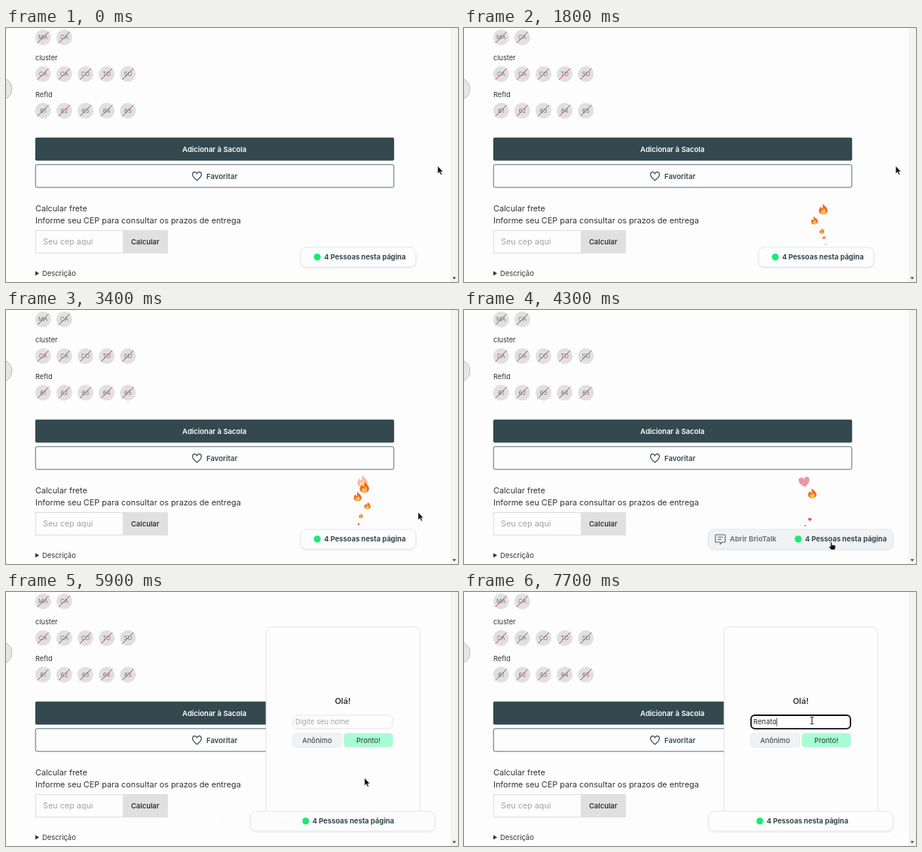
These frames come from a looping animation (600 by 338 pixels, 8 s). An HTML page:

```html
<!DOCTYPE html>
<html lang="pt-BR">
<head>
<meta charset="utf-8">
<style>
  html, body { margin: 0; height: 100%; overflow: hidden; background: #fdfdfd; }
  svg { display: block; width: 100vw; height: 100vh; }
  text { font: 9.4px Inter, "Open Sans", sans-serif; fill: #333; white-space: pre; }
  .b { font-weight: 600; }
  .bold { font-weight: 700; }
  .big { font-size: 10.8px; }
  .mid { text-anchor: middle; }
  .ink { fill: #33494f; }
  .hint { fill: #a3a3a3; }
  .line { fill: none; stroke: #33494f; }
</style>
</head>
<body>
<svg viewBox="0 0 600 338">
  <defs>
    <g id="flame" transform="scale(1.2 1)">
      <path fill="#ee6a2c" d="M0-10C2-6 7-3 7 3C7 8 3 10 0 10C-4 10-7 7-7 3C-7 0-5-2-4-5C-3-2-2-1-1-1C0-4-1-7 0-10Z"/>
      <path fill="#ffc33c" d="M1-2C2 1 4 2 4 5C4 8 2 9.500 0 9.500C-3 9.500-4 7-4 5C-4 3-3 2-2.500 1C-2 2-1 3 0 3C1 1 0 0 1-2Z"/>
    </g>
    <path id="heart" fill="#e5495c" d="M0 9C-6 4-9 1-9-3C-9-9-2-9 0-4C2-9 9-9 9-3C9 1 6 4 0 9Z"/>
    <clipPath id="clip"><rect id="clipBox" x="340" width="215" height="300"/></clipPath>
    <filter id="shadow" x="-10%" y="-30%" width="120%" height="170%">
      <feDropShadow dx="0" dy="1" stdDeviation="1.2" flood-opacity=".1"/>
    </filter>
  </defs>

  <rect width="600" height="338" fill="#fdfdfd"/>
  <rect x="590" width="10" height="338" fill="#f4f4f4"/>
  <path d="M592.500 331.500h5l-2.500 3z" fill="#444"/>
  <circle cx="-7" cy="81" r="15" fill="#e6e6e6" stroke="#aaa" stroke-width=".7"/>

  <g id="swatches"></g>
  <text x="39" y="43" style="font-size:9.2px">cluster</text>
  <text x="39" y="91.500" style="font-size:9.2px">RefId</text>

  <rect x="38.800" y="145.800" width="476.400" height="30.800" rx="2" fill="#33494f"/>
  <text class="b mid" x="276.700" y="164.500" style="font-size:9.5px;fill:#fff">Adicionar à Sacola</text>
  <rect class="line" x="39.200" y="181.800" width="475.600" height="30.300" rx="2" stroke-width=".8"/>
  <path class="line" stroke-width="1.200" d="M253.500 202.800C249 199 247.600 197.200 247.600 194.900C247.600 191 252 190.400 253.500 193.700C255 190.400 259.400 191 259.400 194.900C259.400 197.200 258 199 253.500 202.800Z"/>
  <text class="b ink" x="266" y="200.500" style="font-size:9.6px">Favoritar</text>

  <text class="big" x="39" y="244">Calcular frete</text>
  <text class="big" x="39" y="259.500">Informe seu CEP para consultar os prazos de entrega</text>
  <rect x="39.500" y="269.500" width="116" height="30" fill="#fdfdfd" stroke="#dcdcdc"/>
  <text class="big hint" x="49" y="288">Seu cep aqui</text>
  <rect x="155" y="269" width="60" height="31" rx="1" fill="#e0e0e0"/>
  <text class="b mid" x="184.700" y="287.700">Calcular</text>
  <path d="M39 323.500l5 3-5 3z" fill="#333"/>
  <text x="48" y="330">Descrição</text>

  <g id="sparks"></g>

  <g id="panel" clip-path="url(#clip)">
    <rect id="frame" x="345.200" width="204.200" rx="7" fill="#fdfdfd" stroke="#e2e3e6"/>
    <g id="form">
      <text class="b mid" x="447" y="148.500" style="font-size:11px">Olá!</text>
      <rect id="field" x="381" y="164" width="132" height="17.800" rx="5" fill="#fdfdfd"/>
      <text id="entry" x="384" y="176"></text>
      <path id="caret" stroke="#222" stroke-width=".8"/>
      <rect x="380.500" y="188" width="65" height="18.300" rx="4" fill="#f1f2f4" stroke="#e2e4e8" stroke-width=".7"/>
      <text class="mid" x="413" y="200.500">Anônimo</text>
      <rect x="448.700" y="188" width="64.800" height="18.300" rx="4" fill="#a6fdd3" stroke="#c6f6e0" stroke-width=".7"/>
      <text class="mid" x="481" y="200.500">Pronto!</text>
    </g>
  </g>

  <rect id="pill" y="292" height="26" rx="7" stroke="#dfe2e5" stroke-width=".8" filter="url(#shadow)"/>
  <g id="people">
    <g id="label">
      <path d="M-109-5.800h11a1 1 0 0 1 1 1v8a1 1 0 0 1-1 1h-3l-2.500 2.500v-2.500h-5.500a1 1 0 0 1-1-1v-8a1 1 0 0 1 1-1zM-107-2.500h7M-107 .700h5" fill="none" stroke="#5c686e" stroke-width="1.100"/>
      <text id="action" class="bold" x="-91" y="3.300" style="fill:#6f7a81"></text>
    </g>
    <circle id="halo" fill="#16ec6e"/>
    <circle r="4.500" fill="#16ec6e"/>
    <text class="bold ink" x="9" y="3.300">4 Pessoas nesta página</text>
  </g>

  <g id="cursor" stroke-linejoin="round">
    <path d="M0 0V10.500L2.400 8.300L4 12L5.800 11.200L4.200 7.700H7.300Z" fill="#111" stroke="#fff" stroke-width=".6"/>
    <path d="M-.500.500C.400-.200 1.300.300 1.300 1.300V4L5 4.600C6 4.900 6.300 5.600 6.100 6.600L5.500 10.500H.300L-2.600 7C-3 6-2 5.300-.500 6.700Z" fill="#111" stroke="#fff" stroke-width=".5"/>
    <path d="M-2-4.500H-.500L0-4L.500-4.500H2M0-4V4M-2 4.500H-.500L0 4L.500 4.500H2" fill="none" stroke="#111"/>
  </g>
</svg>

<script>
const LOOP = 8000, LIFE = 1150, NAME = "Renato";
const $ = id => document.getElementById(id);
const set = (el, attrs) => { for (const k in attrs) el.setAttribute(k, attrs[k]); };
const add = (parent, tag, attrs) => {
  const el = document.createElementNS("http://www.w3.org/2000/svg", tag);
  set(el, attrs);
  return parent.appendChild(el);
};
const ramp = (t, start, span) => Math.max(0, Math.min(1, (t - start) / span));
const smooth = u => u * u * (3 - 2 * u);

// Crossed-out option swatches
[[12.5, "MA CA"], [61.3, "CA CA CO TO SU"], [110, "61 62 63 64 65"]].forEach(([y, row]) =>
  row.split(" ").forEach((code, i) => {
    const x = 49.2 + 28.15 * i, g = $("swatches");
    add(g, "circle", { cx: x, cy: y, r: 10.5, fill: "#e0e0e0" });
    add(g, "text", { x, y: y + 2.8, class: "mid", style: "font-size:7.8px;fill:#777" }).textContent = code;
    add(g, "path", { d: `M${x - 7.5} ${y + 7.5}l15-15`, stroke: "#b8465c" });
  }));

// Rising reactions: birth, start x, drift, heart?
const sparks = [
  [857, 480, -4], [1070, 479, -22], [1295, 479, -9], [1455, 480, -7], [1675, 480, 0],
  [1850, 478, -10], [2060, 474, 4], [2285, 476, -3], [2388, 474, 2], [2554, 474, -10],
  [2733, 474, 10], [2963, 473, -5], [3195, 472, -21, 1], [3397, 470, -10],
  [3955, 457, 7, 1], [4145, 453, 0, 1], [4350, 455, -6, 1]
].map(([birth, x, drift, heart]) => ({
  birth, x, drift, el: add($("sparks"), "use", { href: heart ? "#heart" : "#flame" })
}));

// Pointer stops: start, span, x, y
const moves = [[2200, 700, 547, 269], [3700, 400, 487, 308.5], [5600, 650, 462, 171]];
const pointer = t => moves.reduce(([x, y], [start, span, nx, ny]) => {
  const u = smooth(ramp(t, start, span));
  return [x + (nx - x) * u, y + (ny - y) * u];
}, [573, 183.5]);

function draw(t) {
  for (const { birth, x, drift, el } of sparks) {
    const p = (t - birth) / LIFE, on = p > 0 && p < 1;
    el.style.display = on ? "" : "none";
    if (on) set(el, {
      transform: `translate(${x + drift * p} ${291 - 66 * p ** 1.4}) rotate(${drift / 2}) scale(${0.84 * p})`,
      opacity: Math.min(1, (1 - p) * 15)
    });
  }

  const shut = (1 - ramp(t, 4600, 500)) ** 3, top = 46.3 + 250 * shut;
  $("panel").style.display = t >= 4600 ? "" : "none";
  set($("frame"), { y: top, height: 312 - top });
  set($("clipBox"), { y: top - 1 });
  set($("form"), { transform: `translate(0 ${125 * shut})` });

  const focus = t >= 6500, typed = Math.max(0, Math.min(NAME.length, Math.floor((t - 7200) / 100) + 1));
  set($("field"), { stroke: focus ? "#111" : "#dcdfe3", "stroke-width": focus ? 1.8 : 0.8 });
  const entry = $("entry");
  entry.textContent = typed ? NAME.slice(0, typed) : "Digite seu nome";
  set(entry, { class: typed ? "" : "hint" });
  const end = 384.3 + (typed ? entry.getComputedTextLength() : 0);
  set($("caret"), { d: `M${end} 167.500v11`, visibility: focus ? "visible" : "hidden" });

  const wide = smooth(ramp(t, 3950, 250)), hover = wide - smooth(ramp(t, 5700, 250));
  const center = 467.5 - 20.5 * wide, width = 153 + 92 * wide;
  const mix = (a, b) => Math.round(a + (b - a) * hover);
  set($("pill"), { x: center - width / 2, width, fill: `rgb(${mix(253, 240)},${mix(253, 242)},${mix(253, 244)})` });
  set($("people"), { transform: `translate(${center - 54.3 + 51 * hover} 304.800)` });
  set($("label"), { opacity: hover ** 2 });
  $("action").textContent = (t < 4600 ? "Abrir" : "Fechar") + " BrioTalk";
  const pulse = t % 1000 / 1000;
  set($("halo"), { r: 4.5 + 2 * pulse, opacity: 0.3 * (1 - pulse) });

  const [x, y] = pointer(t);
  const overField = t > 5600 && y < 182, overPill = t > 3800 && y > 292;
  const shape = overField ? 2 : overPill ? 1 : 0;
  [...$("cursor").children].forEach((el, i) => el.style.display = i === shape ? "" : "none");
  set($("cursor"), { transform: `translate(${x} ${y})` });
}

const begin = performance.now();
function tick() {
  draw((performance.now() - begin) % LOOP);
  requestAnimationFrame(tick);
}
tick();
</script>
</body>
</html>
```
